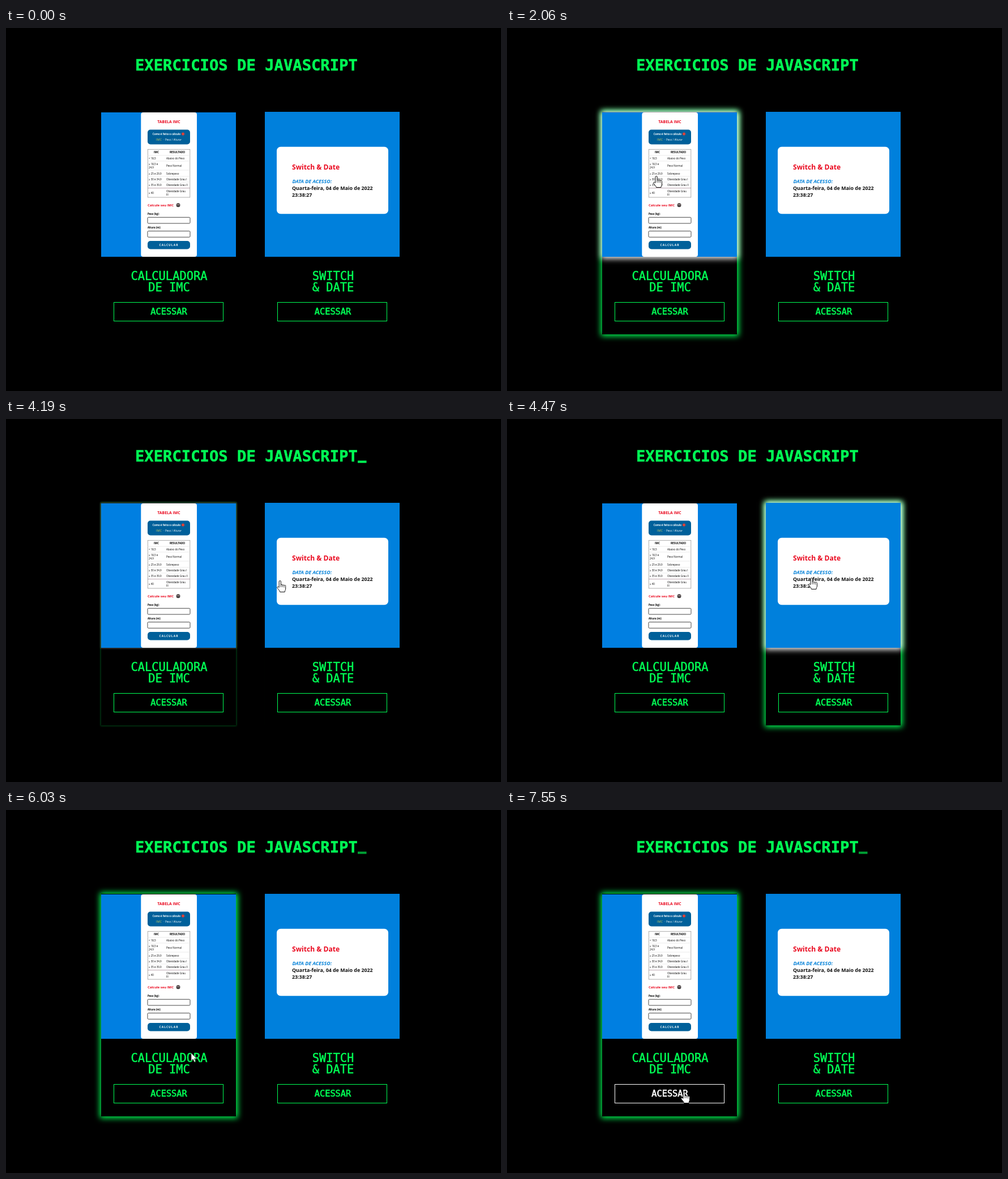
An HTML page that plays this animation: 874 px wide and 641 px high, repeating every 8 s.

```html
<!DOCTYPE html>
<html lang="pt-BR">
<head>
<meta charset="utf-8">
<title>Exercicios de JavaScript</title>
<style>
  html, body { margin: 0; width: 874px; height: 641px; overflow: hidden; background: #000; }
  div { position: absolute; top: 148px; width: 238px; }
  .card { height: 392.5px; background: #000; }
  .shot { height: 256px; background: #0080dc; }
  .left { left: 168px; }
  .right { left: 457px; }
  .shot.left { top: 149px; height: 255px; background: #007fe1; }
  svg { position: absolute; inset: 0; }
  text { font-family: "Open Sans", sans-serif; }
  .mono text { font-family: "DejaVu Sans Mono", monospace; fill: #00ff55; }
  .mid { text-anchor: middle; }
  .bold { font-weight: 700; }
  .red { fill: #ea0a20; }
  .button { fill: none; stroke: #00ff55; }
  .label { font-size: 15.3px; stroke: currentColor; stroke-width: .6; color: #00ff55; }
  .mono .label { fill: currentColor; }
</style>
</head>
<body>
<div class="card left" id="card1"></div>
<div class="card right" id="card2"></div>
<div class="shot left" id="shot1"></div>
<div class="shot right" id="shot2"></div>

<svg width="874" height="641" viewBox="0 0 874 641">
  <g class="mono">
    <text class="bold" x="228" y="74.8" font-size="27.2" stroke="#00ff55" stroke-width=".5">EXERCICIOS DE JAVASCRIPT</text>
    <rect id="caret" x="621" y="73.5" width="15.5" height="4" fill="#00ff55"/>
    <g class="mid" font-size="20.4" stroke="#00ff55" stroke-width=".5">
      <text x="288" y="444.8">CALCULADORA</text>
      <text x="288" y="464.8">DE IMC</text>
      <text x="577.5" y="444.8">SWITCH</text>
      <text x="577.5" y="464.8">&amp; DATE</text>
    </g>
    <rect class="button" id="button1" x="190.5" y="484.5" width="193" height="33"/>
    <text class="label mid" id="label1" x="287.5" y="506">ACESSAR</text>
    <rect class="button" x="479.5" y="484.5" width="193" height="33"/>
    <text class="label mid" x="577" y="506">ACESSAR</text>
  </g>

  <!-- BMI calculator -->
  <rect x="238.3" y="149" width="98.7" height="255" rx="4" fill="#fff"/>
  <text class="bold red mid" x="287.5" y="168" font-size="6.9">TABELA IMC</text>
  <g fill="#00609a">
    <rect x="250" y="179.5" width="75" height="26" rx="5"/>
    <rect x="250" y="376" width="75" height="14.5" rx="5"/>
  </g>
  <g fill="#fff">
    <text class="bold mid" x="283.5" y="189" font-size="4.5">Como é feito o cálculo</text>
    <text x="265" y="199" font-size="5.6" fill="#c4c860">IMC</text>
    <text x="277" y="199" font-size="4.6" fill="#3d8ab8">=</text>
    <text x="281" y="199" font-size="4.6">Peso / Altura²</text>
    <text class="bold mid" x="287.5" y="385" font-size="5" letter-spacing="1">CALCULAR</text>
  </g>
  <circle cx="312.5" cy="187" r="2.6" fill="#d8433c"/>
  <g fill="none" stroke="#999" stroke-width=".8">
    <rect x="250.3" y="214.3" width="74.5" height="84.7"/>
    <path d="M250 225h75M250 235h75M250 251h75M250 262h75M250 272h75" stroke="#ddd" stroke-width=".6"/>
    <path d="M250 282.7h75" stroke="#a88c98"/>
  </g>
  <g id="table" font-size="4.5" font-weight="500">
    <text class="bold mid" x="265.5" y="221.2" font-size="4.7">IMC</text>
    <text class="bold mid" x="302.5" y="221.2" font-size="4.7">RESULTADO</text>
  </g>
  <text class="bold red" x="250" y="315" font-size="5.9">Calcule seu IMC</text>
  <circle cx="304" cy="312.7" r="3.5" fill="#443f40"/>
  <path d="M301.5 312h5" stroke="#c8b0b0"/>
  <g class="bold" font-size="4.4">
    <text x="250" y="329.5">Peso (kg):</text>
    <text x="250" y="353.5">Altura (m):</text>
  </g>
  <g fill="#fff" stroke="#333" stroke-width=".9">
    <rect x="250" y="334.3" width="75" height="10.7" rx="1.5"/>
    <rect x="250" y="358.6" width="75" height="10.7" rx="1.5"/>
  </g>

  <!-- Date panel -->
  <rect x="478" y="209.7" width="197" height="118.6" rx="7" fill="#fff"/>
  <g class="bold" font-size="8.85">
    <text class="red" x="505" y="250" font-size="12.1">Switch &amp; Date</text>
    <text x="505.5" y="274" fill="#0080d8" font-style="italic">DATA DE ACESSO:</text>
    <text x="505" y="286" fill="#111">Quarta-feira, 04 de Maio de 2022</text>
    <text x="505" y="298" fill="#111">23:38:27</text>
  </g>

  <g id="pointer" fill="#fff" stroke="#111" stroke-linejoin="round">
    <path id="arrow" stroke-width=".6" d="M0 0V13.5L3.2 10.7 5.4 15.8 7.7 14.8 5.5 9.9H9.8Z"/>
    <g id="hand" transform="translate(-6)">
      <path d="M4 12.5V2.2a1.6 1.6 0 0 1 3.2 0V8a1.5 1.5 0 0 1 2.8.7 1.5 1.5 0 0 1 2.8.7 1.4 1.4 0 0 1 2.7 1V15c0 2-1.5 3-1.5 5.5H5.5C5.5 18 1 14.5.6 12.7c-.3-1.8 2-2 3.4-.2z"/>
      <path d="M7.2 8v4M10 9v3M12.8 10v2.5" stroke-width=".8"/>
    </g>
  </g>
</svg>

<script>
const $ = id => document.getElementById(id);
const LOOP = 8000;

const rows = [
  [252, 232, "< 18,5"], [283, 232, "Abaixo do Peso"],
  [252, 242, "≥ 18,5 e"], [252, 248, "24,9"], [283, 245, "Peso Normal"],
  [252, 259, "≥ 25 e 29,9"], [283, 259, "Sobrepeso"],
  [252, 269, "≥ 30 e 34,9"], [283, 269, "Obesidade Grau I"],
  [252, 279, "≥ 35 e 39,9"], [283, 279, "Obesidade Grau II"],
  [252, 293, "≥ 40"], [283, 290, "Obesidade Grau"], [283, 296, "III"]
];
$("table").innerHTML += rows.map(([x, y, s]) =>
  `<text x="${x}" y="${y}">${s.replace("<", "&lt;")}</text>`).join("");

// Pointer tip: time, x, y
const path = [
  [930, 142, 646], [1300, 138, 540], [1720, 132, 400], [1790, 160, 368], [1880, 210, 315],
  [2060, 264, 261], [3350, 264, 261], [3700, 279, 289], [3990, 407, 291],
  [4190, 484, 285], [4470, 538, 280], [4800, 538, 280], [5340, 522, 284],
  [5540, 522, 284], [5750, 417, 341], [6030, 327, 429], [6310, 316, 488], [6520, 313, 497]
];

function pointerAt(t) {
  const i = path.findIndex(k => k[0] > t);
  if (i < 0) return path.at(-1).slice(1);
  if (i === 0) return path[0].slice(1);
  const [t0, x0, y0] = path[i - 1], [t1, x1, y1] = path[i];
  const p = (t - t0) / (t1 - t0);
  return [x0 + (x1 - x0) * p, y0 + (y1 - y0) * p];
}

const ramp = (t, start, length) => Math.min(1, Math.max(0, (t - start) / length));
const within = (v, a, b) => v >= a && v <= b;

function glow(id, p, rgb) {
  $(id).style.boxShadow = p > 0 ? `0 0 ${10 * p}px ${2.5 * p}px rgba(${rgb},${p})` : "none";
}

function draw(t) {
  const hover1 = ramp(t, 1790, 260) - ramp(t, 3990, 280);
  const hover2 = ramp(t, 4180, 290) - ramp(t, 5750, 270);
  const graze = Math.max(0, .48 - Math.abs(t - 5900) / 300);
  glow("card1", hover1 + ramp(t, 5790, 240), "0,255,85");
  glow("card2", hover2, "0,255,85");
  glow("shot1", hover1 + graze, "255,255,255");
  glow("shot2", hover2, "255,255,255");

  // The page stops blinking once the link is followed
  const late = t >= 5890;
  const lit = late || (t >= 400 && (t - 400) % 1100 < 550);
  $("caret").setAttribute("opacity", lit ? (late ? .63 : 1) : 0);

  const white = ramp(t, 6310, 240);
  const color = `rgb(${255 * white},255,${85 + 170 * white})`;
  $("button1").style.stroke = $("label1").style.color = color;

  const [x, y] = pointerAt(t);
  const onShot = within(y, 148, 404) && (within(x, 168, 406) || within(x, 457, 695));
  const onButton = within(x, 190, 384) && within(y, 485, 518);
  const link = onShot || onButton;
  $("pointer").setAttribute("transform", `translate(${x} ${y})`);
  $("arrow").style.display = link ? "none" : "";
  $("hand").style.display = link ? "" : "none";
}

const start = performance.now();
function tick() {
  draw((performance.now() - start) % LOOP);
  requestAnimationFrame(tick);
}
tick();
</script>
</body>
</html>
```
